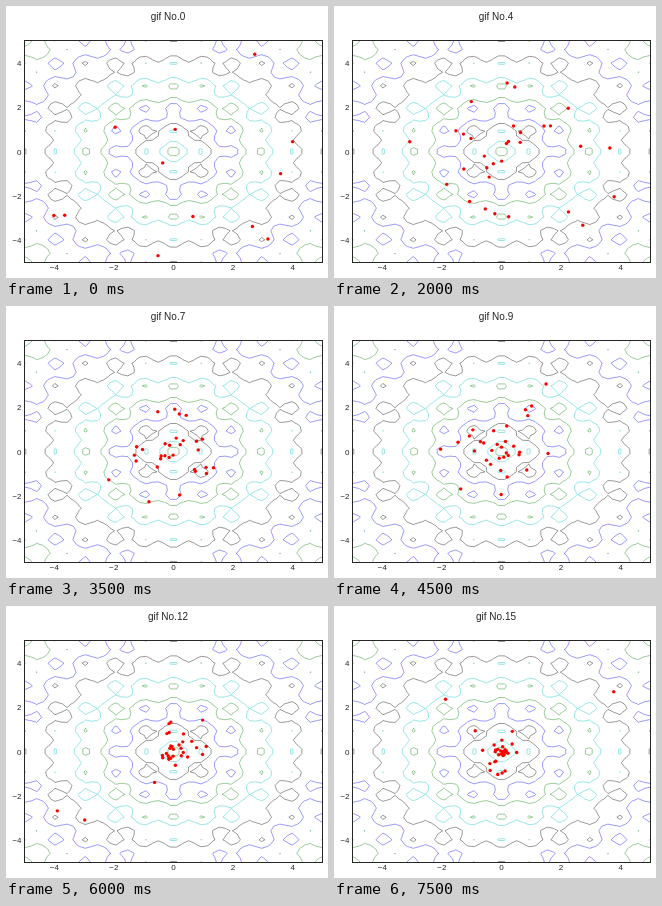
Write an HTML page that moves like this. It is 322 px wide and 272 px high and loops after 8000 ms.

```html
<!DOCTYPE html>
<html>
<head>
<meta charset="utf-8">
<style>
html, body { margin: 0; width: 100%; height: 100%; overflow: hidden; background: #fff; }
svg { display: block; }
text { font: 8px "Liberation Sans", Arial, sans-serif; fill: #262626; text-anchor: middle; }
#title { font-size: 10px; }
</style>
</head>
<body>
<svg width="322" height="272" viewBox="0 0 322 272">
  <clipPath id="box"><rect x="18" y="34" width="299" height="223"/></clipPath>
  <g id="lines" fill="none" stroke-width=".4" clip-path="url(#box)"></g>
  <g id="dots" fill="#f00" clip-path="url(#box)"></g>
  <rect x="18.5" y="34.5" width="298" height="222" fill="none" stroke="#262626"/>
  <g id="ticks"></g>
  <text id="title" x="162" y="14"></text>
</svg>
<script>
const $ = id => document.getElementById(id);
const px = x => 167.5 + x * 29.8;
const py = y => 145.5 - y * 22.2;

function add(parent, tag, attrs, label = '') {
  const el = document.createElementNS('http://www.w3.org/2000/svg', tag);
  for (const k in attrs) el.setAttribute(k, attrs[k]);
  el.textContent = label;
  parent.append(el);
}

for (let v = -4; v <= 4; v += 2) {
  const label = String(v).replace('-', '\u2212');
  add($('ticks'), 'text', { x: px(v), y: 264 }, label);
  add($('ticks'), 'text', { x: 15.5, y: py(v) + 3, style: 'text-anchor:end' }, label);
}

// Ackley function on a coarse grid, contoured with marching squares
const N = 50, TAU = 2 * Math.PI;
const axis = i => -5 + 10 * i / (N - 1);
const ackley = (x, y) => 20 + Math.E - 20 * Math.exp(-0.2 * Math.sqrt((x * x + y * y) / 2))
  - Math.exp((Math.cos(TAU * x) + Math.cos(TAU * y)) / 2);

function contour(level) {
  let d = '';
  const segment = (a, b) => { d += `M${a}L${b}`; };
  for (let i = 0; i < N - 1; i++) for (let j = 0; j < N - 1; j++) {
    const corners = [[i, j], [i + 1, j], [i + 1, j + 1], [i, j + 1]].map(([a, b]) => {
      const x = axis(a), y = axis(b);
      return { x, y, z: ackley(x, y) };
    });
    const cuts = [];
    corners.forEach((a, k) => {
      const b = corners[(k + 1) % 4];
      if (a.z > level === b.z > level) return;
      const t = (level - a.z) / (b.z - a.z);
      cuts.push([px(a.x + t * (b.x - a.x)).toFixed(2), py(a.y + t * (b.y - a.y)).toFixed(2)]);
    });
    if (cuts.length === 2) segment(cuts[0], cuts[1]);
    if (cuts.length === 4) {
      const mean = corners.reduce((sum, p) => sum + p.z, 0) / 4;
      const s = (mean > level) === (corners[0].z > level) ? 0 : 3;
      segment(cuts[s], cuts[(s + 1) % 4]);
      segment(cuts[(s + 2) % 4], cuts[(s + 3) % 4]);
    }
  }
  return d;
}

const colors = ['#008000', '#00bfbf', '#000', '#00f'];
for (let k = 0; k < 9; k++)
  add($('lines'), 'path', { d: contour(1.5 * (k + 1)), stroke: colors[k % 4] });

// Particles start spread beyond the box and swing into the minimum at the centre
let seed = 2024;
function random(lo, hi) {
  seed = (seed * 16807) % 2147483647;
  return lo + (hi - lo) * seed / 2147483647;
}
const swing = decay => ({ start: random(-7.5, 7.5), speed: random(0.4, 1.4), decay });
const swarm = Array.from({ length: 32 }, () => {
  const decay = random(0.8, 0.96);
  return { x: swing(decay), y: swing(decay) };
});
const at = (s, gen) => s.start * s.decay ** gen * Math.cos(s.speed * gen);

let shown = -1;
function draw() {
  const gen = Math.floor(performance.now() % 8000 / 500);
  if (gen !== shown) {
    shown = gen;
    $('title').textContent = 'gif No.' + gen;
    $('dots').replaceChildren();
    for (const p of swarm)
      add($('dots'), 'circle', { cx: px(at(p.x, gen)), cy: py(at(p.y, gen)), r: 1.7 });
  }
  requestAnimationFrame(draw);
}
draw();
</script>
</body>
</html>
```
